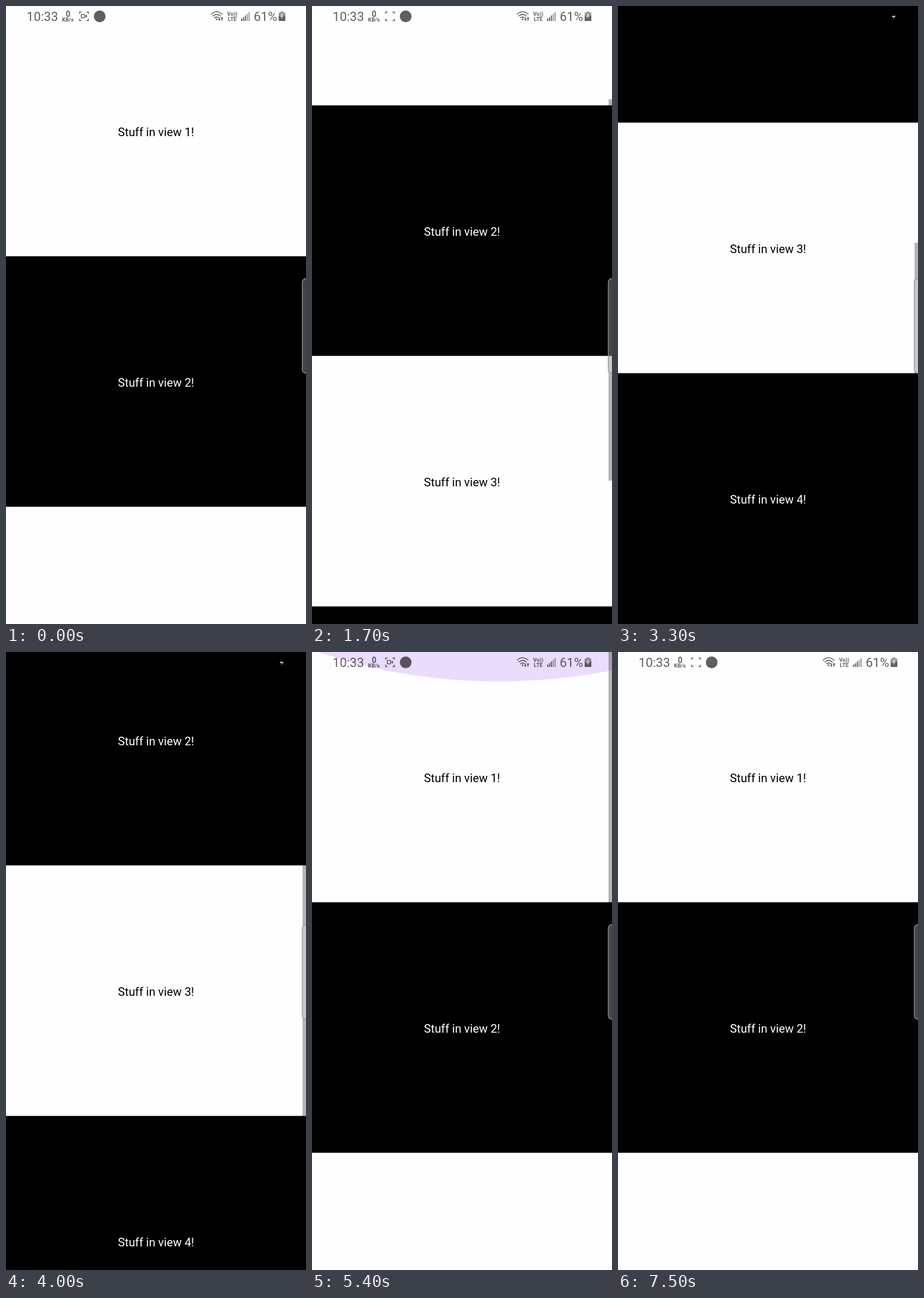
An HTML page for the animation above (7.9 s loop, 522x1073 px).

```html
<!DOCTYPE html>
<html lang="en">
<head>
<meta charset="utf-8">
<title>Scrolling views</title>
<style>
  html, body { margin: 0; width: 100%; height: 100%; overflow: hidden; background: #fefdff; }
  svg { display: block; width: 100%; height: 100%; }
  text { font-family: Roboto, "Noto Sans", sans-serif; }
  .label { font-size: 20.3px; text-anchor: middle; }
  .status { fill: #000; opacity: .62; }
  .time { font-size: 22px; }
  .tiny { font-size: 9.5px; font-weight: 700; text-anchor: middle; }
  .line { fill: none; stroke: #000; stroke-width: 1.5; }
</style>
</head>
<body>
<svg viewBox="0 0 522 1073" preserveAspectRatio="none">
  <rect width="522" height="1073" fill="#fefdff"/>
  <g id="list"></g>
  <ellipse id="topGlow" cx="325" rx="626" fill="#6200ee"/>
  <ellipse id="endGlow" cx="325" rx="626" fill="#6200ee"/>
  <rect id="bar" x="516" width="6" height="662" fill="#000"/>

  <g class="status">
    <text class="time" x="35.8" y="26">10:33</text>
    <text class="tiny" x="108" y="18.5" style="font-size:14px">0</text>
    <text class="tiny" x="107.7" y="27.3">KB/s</text>
    <path class="line" d="M128 13.500V10.500H131.500M140 10.500H143.500V13.500M143.500 22V25.200H140M131.500 25.200H128V22"/>
    <g id="camera">
      <rect class="line" x="131" y="14.700" width="6" height="5.800" rx=".8"/>
      <path d="M137.500 17.600L141 14.800V20.500Z"/>
    </g>
    <circle cx="163" cy="18" r="10.200"/>
    <path class="line" d="M356.500 14.500Q366.500 5.500 376.500 14.500M359.500 17.800Q366.500 11.500 373.500 17.800M362.500 20.900Q366.500 17.500 370 20.700"/>
    <path d="M364.300 22.500Q366.500 20.800 368.600 22.500L366.500 25Z"/>
    <path d="M370.600 19.500V23H369L371.400 26L373.800 23H372.200V19.500ZM375 25.500V22H373.500L375.900 18.800L378.300 22H376.600V25.500Z"/>
    <text class="tiny" x="393.700" y="16.500">Vo))</text>
    <text class="tiny" x="393.700" y="26">LTE</text>
    <path d="M409 22h2v4h-2zM412.300 19.500h2v6.500h-2zM415.600 16.500h2v9.500h-2z"/>
    <path d="M418.900 13.500h2v12.500h-2zM422 10.500h2v15.500h-2z" opacity=".6"/>
    <text class="time" x="431" y="26">61%</text>
    <path fill-rule="evenodd" opacity=".65" d="M474.500 11.500H477.500V9.500H483V11.500H486V16.500H474.500ZM481.500 12.500L477.500 16.500H481Z"/>
    <path d="M474.500 16.500H486V26H474.500Z"/>
  </g>
  <path d="M477 17H483L479 23.500L480 19.200H476.500Z" fill="#c4c4c4"/>

  <rect x="515.500" y="473.500" width="20" height="164" rx="6" fill="#fff" fill-opacity=".27" stroke="#929292" stroke-width="1.300"/>
</svg>
<script>
const LOOP = 7900, STEP = 100;
const VIEW = 435, STAGE = 1073, RADIUS = 626, RISE = 84;
const $ = id => document.getElementById(id);
const set = (id, attrs) => {
  for (const name in attrs) $(id).setAttribute(name, attrs[name]);
};

// Progress from 0 to 1; a power above 1 slows down, below 1 speeds up.
function ease(t, start, end, power = 1) {
  const p = Math.min(1, Math.max(0, (t - start) / (end - start)));
  return 1 - (1 - p) ** power;
}

const gestures = [
  { start: 100, end: 1700, by: 262, power: 1 },
  { start: 1700, end: 2400, by: 254, power: 1.6 },
  { start: 2700, end: 3000, by: 151, power: .45 },
  { start: 3500, end: 4000, by: -168, power: 1 },
  { start: 4000, end: 5300, by: -499, power: 2.09 }
];

function scrollAt(t) {
  return gestures.reduce((y, g) => y + g.by * ease(t, g.start, g.end, g.power), 0);
}

// Overscroll glow: quick swell, then a decelerating retreat.
function pull(t, start, peak, end, size) {
  return size * ease(t, start, peak, 2.8) * (1 - ease(t, peak, end, 2));
}

function glow(id, amount, atEnd) {
  const cy = (RISE - RADIUS) * amount;
  set(id, {
    cy: atEnd ? STAGE - cy : cy,
    ry: RADIUS * amount,
    opacity: Math.min(.14, .214 * amount)
  });
}

$("list").innerHTML = [0, 1, 2, 3].map(i => {
  const top = i * VIEW;
  const [back, ink] = i % 2 ? ["#000", "#fff"] : ["#fefdff", "#000"];
  return `<rect y="${top - .5}" width="522" height="${VIEW + 1}" fill="${back}"/>
    <text class="label" x="261" y="${top + 226}" fill="${ink}">Stuff in view ${i + 1}!</text>`;
}).join("");

function draw(t) {
  const y = Math.round(scrollAt(t));
  const shown = t < 200 ? 0 : 1 - ease(t, 6700, 7000);
  set("list", { transform: `translate(0 ${-y})` });
  set("bar", { y: Math.round(y * STAGE / (4 * VIEW)), opacity: .29 * shown });
  set("camera", { visibility: t % 1000 < 500 ? "visible" : "hidden" });
  glow("topGlow", pull(t, 5200, 5800, 6500, .895), false);
  glow("endGlow", pull(t, 2900, 3000, 3300, .5), true);
}

const start = performance.now();
function tick() {
  const t = (performance.now() - start) % LOOP;
  draw(Math.floor(t / STEP) * STEP);
  requestAnimationFrame(tick);
}
tick();
</script>
</body>
</html>
```
